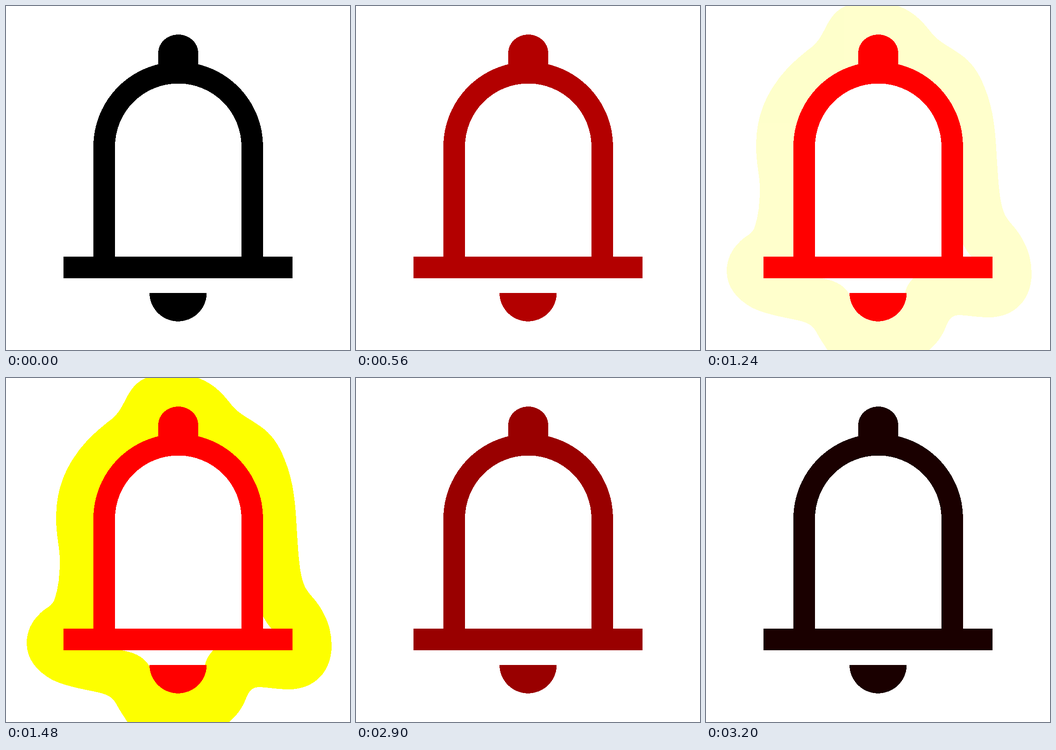
These frames come from a looping animation (748x748 px, 3.26 s). An HTML page:

```html
<!DOCTYPE html>
<html lang="en">
<head>
<meta charset="utf-8">
<title>Ringing bell</title>
<style>
  html, body { margin: 0; width: 100%; height: 100%; overflow: hidden; background: #fff; }
  svg { display: block; width: 100%; height: 100%; }

  .bell { animation: heat 3260ms infinite; }
  .glow { fill: #fdff00; animation: glow 3260ms infinite; }
  .gap { fill: #fff; }

  /* black to red in ten steps, later back again */
  @keyframes heat {
    0% { fill: #000; animation-timing-function: step-end; }
    6.134% { fill: #000; animation-timing-function: steps(10, start); }
    24.539% { fill: #f00; animation-timing-function: step-end; }
    83.435% { fill: #f00; animation-timing-function: steps(9, start); }
    100% { fill: #1a0000; }
  }

  /* halo fades in over five steps and cuts out */
  @keyframes glow {
    0% { opacity: 0; animation-timing-function: step-end; }
    38.036% { opacity: 0; animation-timing-function: steps(5, start); }
    47.239% { opacity: 1; animation-timing-function: step-end; }
    77.3%, 100% { opacity: 0; animation-timing-function: step-end; }
  }
</style>
</head>
<body>
<svg viewBox="0 0 748 748" shape-rendering="crispEdges">
  <path class="glow" d="M304 0C282 9 270 27 260 47C250 66 243 81 221 96C188 122 163 147 143 180
    C117 222 108 265 109 310C110 350 117 368 117 398C117 428 114 457 106 480C101 497 86 499 73 513
    C55 530 45 552 45 577C45 610 66 637 100 656C135 673 180 678 210 686C232 692 238 705 246 720
    L264 748H485C500 736 511 721 518 706C526 687 530 672 551 672C572 673 590 677 615 677
    C672 677 708 637 708 582C708 545 696 515 675 487C660 468 650 461 644 437C637 412 635 370 632 325
    C629 265 624 220 605 175C592 142 575 119 550 103C528 87 508 80 490 58C468 30 450 12 418 0Z"/>
  <g class="gap">
    <path d="M214 560V306A160.5 160.5 0 0 1 535 306V560Z"/>
    <path d="M558 516Q567 534 578 546H558Z"/>
    <path d="M245 591C275 595 300 605 312 627H432Q436 605 452 591Z"/>
  </g>
  <g class="bell">
    <path d="M331 140V102A43.5 40 0 0 1 418 102V140Z"/>
    <path fill-rule="evenodd" d="M190 546V306A184.5 184.5 0 0 1 559 306V546Z
      M237 546V306A137.5 137.5 0 0 1 512 306V546Z"/>
    <path d="M125 545H623V592H125Z"/>
    <path d="M312 623.5H436.5A62.25 62.25 0 0 1 312 623.5Z"/>
  </g>
</svg>
</body>
</html>
```
